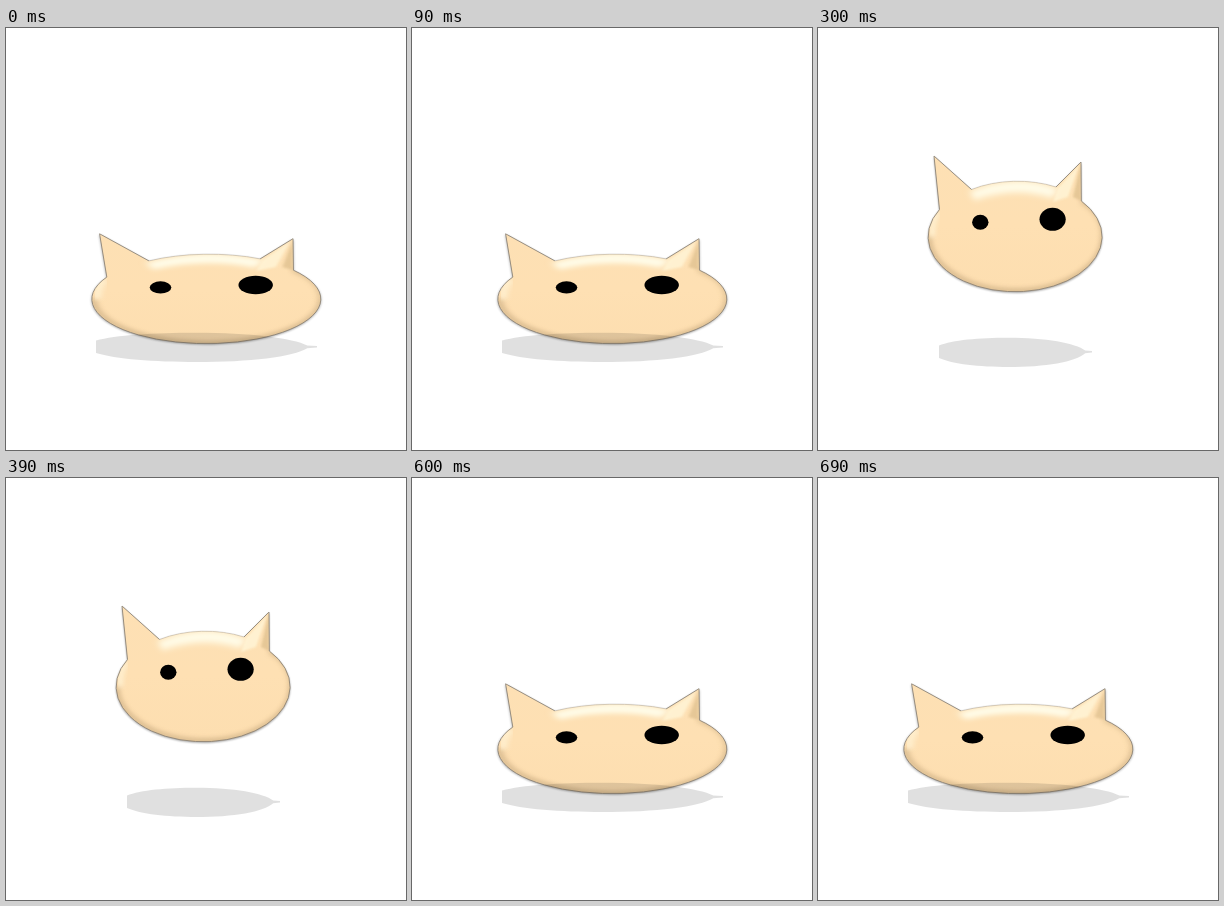
Animation of 400x422 px, one loop 750 ms. Source, as an HTML page:

```html
<!DOCTYPE html>
<html lang="en">
<head>
<meta charset="utf-8">
<title>Bouncing cat head</title>
<style>
  html, body { margin: 0; width: 100%; height: 100%; overflow: hidden; background: #fff; }
  svg { display: block; width: 400px; height: 422px; }
</style>
</head>
<body>
<svg viewBox="0 0 400 422">
  <defs>
    <!-- Head drawn from its top left corner, 174 x 136 -->
    <path id="shape" d="M5 1 L42.5 34.5 A87 55 0 0 1 127 32 L152 7 L152.3 46 A87 55 0 1 1 10.5 54.5 Z"/>
    <clipPath id="inside"><use href="#shape"/></clipPath>
    <linearGradient id="skin" x1="0" y1="0" x2="0" y2="1">
      <stop offset="0" stop-color="#fde0b4"/>
      <stop offset=".5" stop-color="#fee0b3"/>
      <stop offset="1" stop-color="#fddeb0"/>
    </linearGradient>
    <filter id="soft" x="-20%" y="-20%" width="140%" height="140%"><feGaussianBlur stdDeviation="2.4"/></filter>
    <filter id="glow" x="-30%" y="-80%" width="160%" height="260%"><feGaussianBlur stdDeviation="3"/></filter>
    <filter id="halo" x="-10%" y="-10%" width="120%" height="120%"><feGaussianBlur stdDeviation="1.2"/></filter>
    <filter id="edge" x="-20%" y="-20%" width="140%" height="140%"><feGaussianBlur stdDeviation=".4"/></filter>
  </defs>

  <rect width="400" height="422" fill="#fff"/>

  <g id="head">
    <use href="#shape" y="1" fill="#000" opacity=".42" filter="url(#halo)"/>
    <use href="#shape" fill="url(#skin)"/>
    <g clip-path="url(#inside)">
      <path d="M174 81 A87 55 0 0 1 0 81" fill="none" stroke="#a88a60" stroke-width="4" opacity=".55" filter="url(#soft)"/>
      <path d="M152 46 Q174 58 174 81" fill="none" stroke="#b09367" stroke-width="4" opacity=".5" filter="url(#soft)"/>
      <path d="M40 37 Q87 16 130 34 L123 43 Q85 31 46 45 Z" fill="#fffce8" filter="url(#glow)"/>
      <path d="M9 57 Q3 67 3 82" fill="none" stroke="#fff6dc" stroke-width="5" opacity=".8" filter="url(#soft)"/>
      <path d="M150 10 L129 33 L124 47 L139 42 Z" fill="#fff4d6" opacity=".85" filter="url(#halo)"/>
      <path d="M152 8 L144 42 L152 46 Z" fill="#dcbd8b" opacity=".7" filter="url(#halo)"/>
    </g>
    <g fill="none" stroke="#8a8174" filter="url(#edge)">
      <path vector-effect="non-scaling-stroke" d="M127 32 L152 7 L152.3 46 A87 55 0 1 1 10.5 54.5 L5 1 L42.5 34.5" opacity=".85"/>
      <path vector-effect="non-scaling-stroke" d="M42.5 34.5 A87 55 0 0 1 127 32" opacity=".3"/>
    </g>
    <g filter="url(#edge)">
      <ellipse cx="51.3" cy="67.3" rx="8.2" ry="7.5"/>
      <ellipse cx="123.6" cy="64.3" rx="13.1" ry="11.5"/>
    </g>
  </g>

  <path id="ground" opacity=".12" d="M107 317.5 C125 312 160 309.7 200 309.7 C250 309.7 290 315 303 322.5
    L312 323 V324.5 L303 325.2 C290 334 250 339 200 339 C160 339 125 336 107 330 Z"/>
</svg>
<script>
  const STEP = 150;
  // Head box (x, y, w, h) and ground shadow (left, width, lift)
  const low  = { box: [87, 205, 229, 110], shade: [90, 221, -5] };
  const mid  = { box: [97, 175, 199, 108], shade: [107, 205, 0] };
  const high = { box: [111, 127, 174, 136], shade: [121, 153, 0] };
  const cycle = [low, mid, high, mid, low];

  const head = document.getElementById('head');
  const ground = document.getElementById('ground');

  function draw(time) {
    const pose = cycle[Math.floor(time / STEP) % cycle.length];
    const [x, y, w, h] = pose.box;
    const [left, width, lift] = pose.shade;
    head.setAttribute('transform', `translate(${x} ${y}) scale(${w / 174} ${h / 136})`);
    ground.setAttribute('transform', `translate(${left} ${lift}) scale(${width / 205} 1) translate(-107 0)`);
  }

  const start = performance.now();
  function tick() {
    draw(performance.now() - start);
    requestAnimationFrame(tick);
  }
  tick();
</script>
</body>
</html>
```
